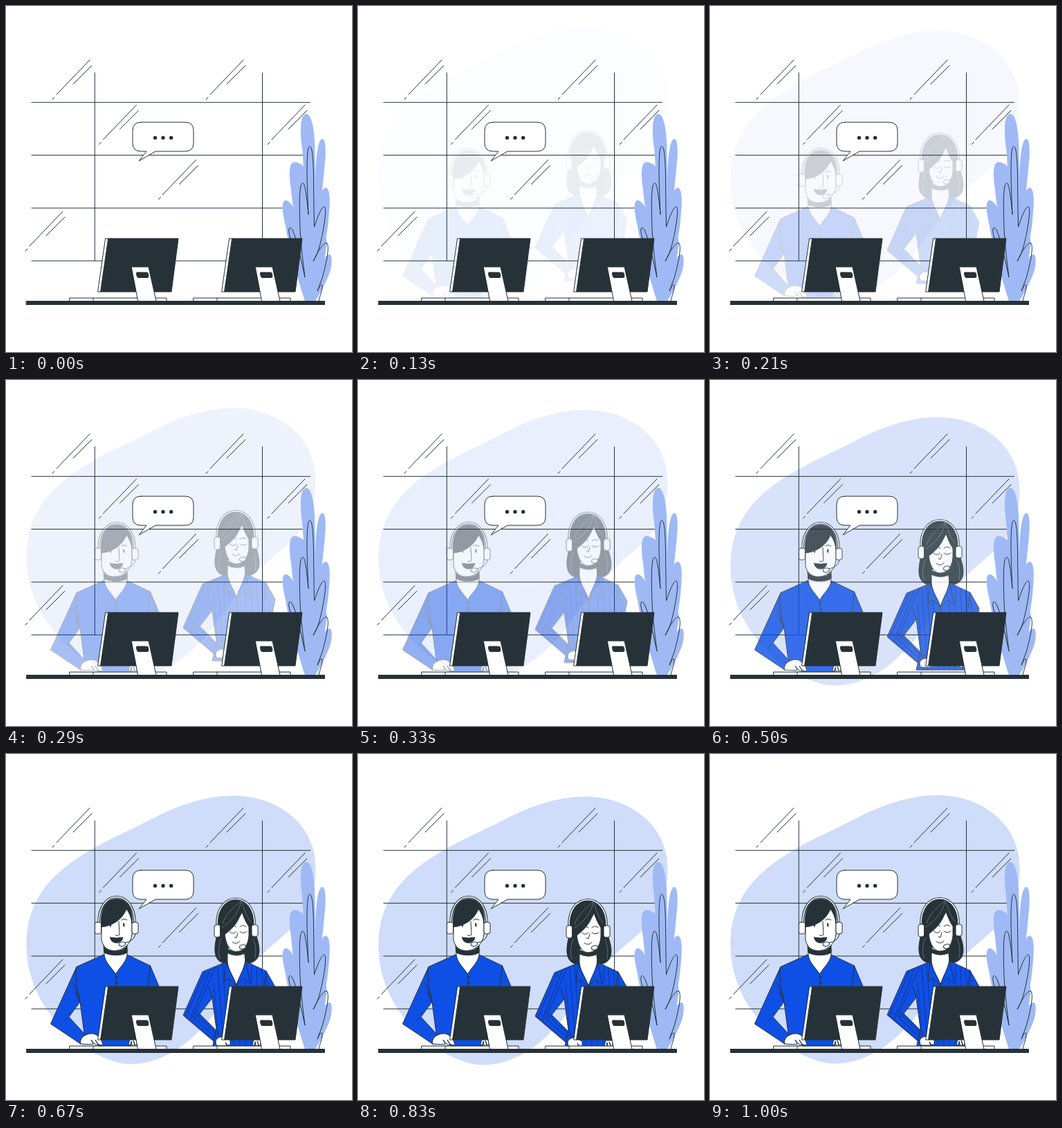
An HTML page without scripts that plays this animation: 500 by 500 pixels, repeating every 1040 ms.

```html
<!DOCTYPE html>
<html lang="en">
<head>
<meta charset="utf-8">
<title>Help desk</title>
<style>
  :root { --ink: #263238; --blue: #0e50e6; --leaf: #9fb9f5; --tint: #cfdcfa; }
  html, body { margin: 0; width: 100%; height: 100%; overflow: hidden; background: #fff; }
  svg { display: block; width: 100vw; height: 100vh; }
  path, rect, ellipse, circle { stroke: var(--ink); stroke-width: 1; stroke-linejoin: round; stroke-linecap: round; fill: none; }
  .white { fill: #fff; }
  .dark { fill: var(--ink); }
  .shirt { fill: var(--blue); }
  .dot { fill: var(--ink); stroke: none; }
  .leaf path { fill: var(--leaf); stroke: none; }
  .blob { fill: var(--tint); stroke: #c3d2f6; stroke-width: .6; }
  .strand path { stroke: #7b858b; stroke-width: .7; }
  .stripes path { stroke: #14379c; stroke-width: 1.5; opacity: .75; }
  .band { stroke-width: 3.6; }
  .band.in { stroke: #fff; stroke-width: 1.5; }

  .drop, .fade { animation: 1040ms infinite, show 1040ms step-end infinite; }
  .drop { animation-name: drop, show; }
  .fade { animation-name: fade, show; }
  @keyframes drop {
    0% { opacity: 0; transform: translateY(-30px); animation-timing-function: cubic-bezier(.33, 0, .5, 1.38); }
    92.3%, 100% { opacity: 1; transform: none; }
  }
  @keyframes fade {
    0% { opacity: 0; animation-timing-function: cubic-bezier(.33, 0, .5, 1.38); }
    92.3%, 100% { opacity: 1; }
  }
  @keyframes show {
    0% { visibility: hidden; }
    7.69%, 100% { visibility: visible; }
  }
</style>
</head>
<body>
<svg viewBox="0 0 500 500">
  <defs>
    <path id="glint" d="M121 78L73 128M70 132L67 135M124 86L97 113"/>
    <g id="screen">
      <path class="white" d="M144 336H148.500L137 413H133Z"/>
      <path class="dark" d="M148 336H249L239 413H137Z"/>
      <path class="white" d="M181.500 377H206L217 426.500H191Z"/>
      <path class="dark" d="M190 385H203.500Q205 385 205.300 386.500L206 390.500Q206 392.500 204 392.500H191.500Q190 392.500 189.500 391L188.300 387Q188 385 190 385Z"/>
    </g>
    <path id="keys" class="white" d="M92 422H232V427H92ZM126 422V427"/>
    <clipPath id="cloth">
      <path d="M318 300L284 314L256 377L303 417L312 407L280 375L298 352L304 397L298 425H372L389 336L376 313L346 299L333 334Z"/>
    </clipPath>
  </defs>

  <g class="drop">
    <path class="blob" d="M330 60C385 60 447 95 447 165C447 232 410 252 375 284C340 316 322 345 300 375C272 412 230 447 180 447C130 447 30 380 30 275C30 205 72 167 125 137C150 122 180 110 210 94C250 73 290 60 330 60Z"/>
  </g>

  <g id="wall">
    <path d="M128.300 96.500V368M370.500 96.500V368M37 139.300H439.500M37 215.600H439.500M37 292H439.500M37 368.300H439.500"/>
    <use href="#glint"/>
    <use href="#glint" x="67.500" y="65"/>
    <use href="#glint" x="222" />
    <use href="#glint" x="311" y="65"/>
    <use href="#glint" x="153.500" y="144.500"/>
    <use href="#glint" x="-39" y="219"/>
  </g>

  <g id="plant">
    <g class="leaf">
      <path d="M434 156C424 156 425 185 428 205C432 250 432 330 436 426H444C446 350 448 260 446 195C445 175 441 156 434 156Z"/>
      <path d="M457 192C450 194 448 220 447 250L443 426C447 350 456 280 460 235C463 210 462 192 457 192Z"/>
      <path d="M416 225.500C407 228 410 250 412 265C415 300 425 360 436 426H442L436 300L434 236C430 230 422 225 416 225.500Z"/>
      <path d="M462 262.500C455 263 450 285 447 310C443 350 440 400 440 426H447C450 380 462 350 466 310C468 290 470 264 462 262.500Z"/>
      <path d="M403 281C397 284 400 300 404 318C408 345 420 390 432 426H440C438 390 430 340 424 312C420 297 410 279 403 281Z"/>
      <path d="M468 359C460 358 452 380 447 400L441 426H447C455 415 464 395 468 385C471 375 472 361 468 359Z"/>
      <path d="M413 300H456L464 342L455 400L446 426H432L414 365Z"/>
    </g>
    <path d="M437 301C435 262 433 203 439 203C446 203 444 262 445.500 319C450 305 456 290 460 290C464 292 460 318 455 340C451 357 447 364 444 369C452 352 460 340 464 343C468 350 462 375 457 393L450 412C454 402 458 400 457 407C456 415 453 420 452 426"/>
    <path d="M437 301C435 283 433 257 429 256C423 256 424 292 425 322C426 348 430 375 432 392C425 360 416 318 410 320.500C407 323 410 334 414 344"/>
  </g>

  <g class="fade" id="man">
    <path class="shirt" d="M142 289.500L102 307.500L64.500 390L108 419L114 405L91 380L107 358L113 404L134 422H180L222 338L208.500 306L175 290L158 318Z"/>
    <path d="M102 307.500C99 320 103 340 107 358M97 331L106 354M100 344L108 361M91 380L85 385M208.500 306L205 337M158 318L160 340"/>
    <path class="white" d="M142 283V290C143 301 153 309 158.500 318C164 308 174 301 175 290V281Z"/>
    <path class="dark" d="M141 276C143 287 172 288 175 276V287C168 292 150 292 142 287Z"/>
    <path class="white" d="M138 240V268C140 281 150 285.500 160 284C172 282 181 273 182 260V240C180 205 139 205 138 240Z"/>
    <path class="dark" d="M137.500 250C136 225 143 209.500 160 209.500C177 209.500 184 226 182 245C181 236 178 229 174 224C168 240 152 249 137.500 250Z"/>
    <ellipse class="dot" cx="151" cy="247" rx="1.200" ry="2.900"/>
    <ellipse class="dot" cx="170.300" cy="247" rx="1.200" ry="2.900"/>
    <path d="M163 242L164 261Q162 264 158.500 262M167 240Q171 237 175 240"/>
    <path class="dark" d="M150.500 265Q159 267 169 265Q167 273 160 273Q152 273 150.500 265Z"/>
    <path class="band" d="M134 244C134 194 186 194 186 244"/>
    <path class="band in" d="M134 244C134 194 186 194 186 244"/>
    <path d="M187 260Q186 270 172 273"/>
    <ellipse class="white" cx="168" cy="274.800" rx="4.600" ry="3" transform="rotate(-12 168 275)"/>
    <rect class="white" x="128.500" y="243" width="9" height="17" rx="3"/>
    <rect class="white" x="182" y="243" width="9" height="17" rx="3"/>
    <circle class="dot" cx="160" cy="322.500" r="1.400"/>
    <circle class="dot" cx="160" cy="331" r="1.400"/>
    <path class="white" d="M108 419C106 411 112 407 118 405C126 402 132 406 137 411L140 420Q136 422 133 419L129 413L133 420Q130 422 127 418L123 413L126 419Q122 420 108 419Z"/>
    <path class="white" d="M177 420L179 412H189V421H187L184 414L186 421H182L181 415L180 420Z"/>
  </g>

  <g class="drop" id="woman">
    <path class="dark" d="M332 209C314 209 306 226 306 246C306 262 301 272 302 285C303 296 309 302 320 302H346C358 302 366 296 366 283C366 270 359 260 359 244C358 224 350 209 332 209Z"/>
    <path class="shirt" d="M318 300L284 314L256 377L303 417L312 407L280 375L298 352L304 397L298 425H372L389 336L376 313L346 299L333 334Z"/>
    <g class="stripes" clip-path="url(#cloth)">
      <path d="M290 310L260 378M296 308L266 384M303 306L272 378M263 372L306 412M270 370L308 408M258 377L303 416M300 330L308 425M306 306L314 425M313 303L322 425M322 325L330 425M333 334L338 425M346 325L346 425M355 306L354 425M362 308L366 400M369 311L378 400M375 314L388 400"/>
    </g>
    <path d="M298 352L293 336M280 375L274 380M376 313L373 337M333 334V340"/>
    <path class="white" d="M320 280V300C322 314 330 323 333 334C336 323 344 313 346 299L344 280Z"/>
    <path class="shirt" d="M318 298L315 328L322 324L333 334C330 322 321 313 318 298ZM346 297L353 331L343 324L333 334C336 321 344 312 346 297Z"/>
    <path class="dark" d="M320 281Q333 289 344 281V288Q332 293 320 287Z"/>
    <path class="white" d="M316 250C315 268 321 284 332 285C343 285 350 276 351 262V247C347 243 344 236 341 228C336 240 326 248 316 250Z"/>
    <path class="dark" d="M341 210C343 232 333 248 316 260L309 250C309 230 320 212 341 210Z"/>
    <path class="dark" d="M341 210C341 231 346 243 352 250L357 246C356 229 350 215 341 210Z"/>
    <g class="strand">
      <path d="M340 212C337 228 326 241 312 250M340 212C329 220 317 232 313 244M341 212C344 226 349 236 354 242M311 266Q305 280 309 295M357 266Q363 280 360 294"/>
    </g>
    <path d="M323 256Q328 261 333 256M338 256Q343 260 348 256M325 249Q329 246 333 249M338 249Q343 245 347 249M335 258L333 265L330 264M327 271Q333 276 338 270"/>
    <path class="band" d="M305 247C303 196 361 196 359 247"/>
    <path class="band in" d="M305 247C303 196 361 196 359 247"/>
    <path d="M360 263Q357 275 346 277"/>
    <ellipse class="white" cx="342" cy="278" rx="4.600" ry="3" transform="rotate(-12 342 278)"/>
    <rect class="white" x="301" y="246" width="8.500" height="18" rx="3"/>
    <rect class="white" x="355" y="246" width="9" height="17" rx="3"/>
    <path class="white" d="M303 417C302 411 308 408 313 408L324 413V420H320L317 416L319 421H306Q303 420 303 417Z"/>
    <path class="white" d="M356 420L358 412H368V421H366L363 414L365 421H361L360 415L359 420Z"/>
  </g>

  <g id="bubble">
    <path class="white" d="M195 168H259Q271 168 271 180V198Q271 210 259 210H216L192 224L203 210H195Q183 210 183 198V180Q183 168 195 168Z"/>
    <circle class="dot" cx="215.500" cy="190.400" r="2.700"/>
    <circle class="dot" cx="227" cy="190.400" r="2.700"/>
    <circle class="dot" cx="238.700" cy="190.400" r="2.700"/>
  </g>

  <g id="desk">
    <use href="#keys"/>
    <use href="#keys" x="179"/>
    <use href="#screen"/>
    <use href="#screen" x="179"/>
    <rect class="dark" x="29.500" y="426.500" width="431" height="5"/>
  </g>
</svg>
</body>
</html>
```
